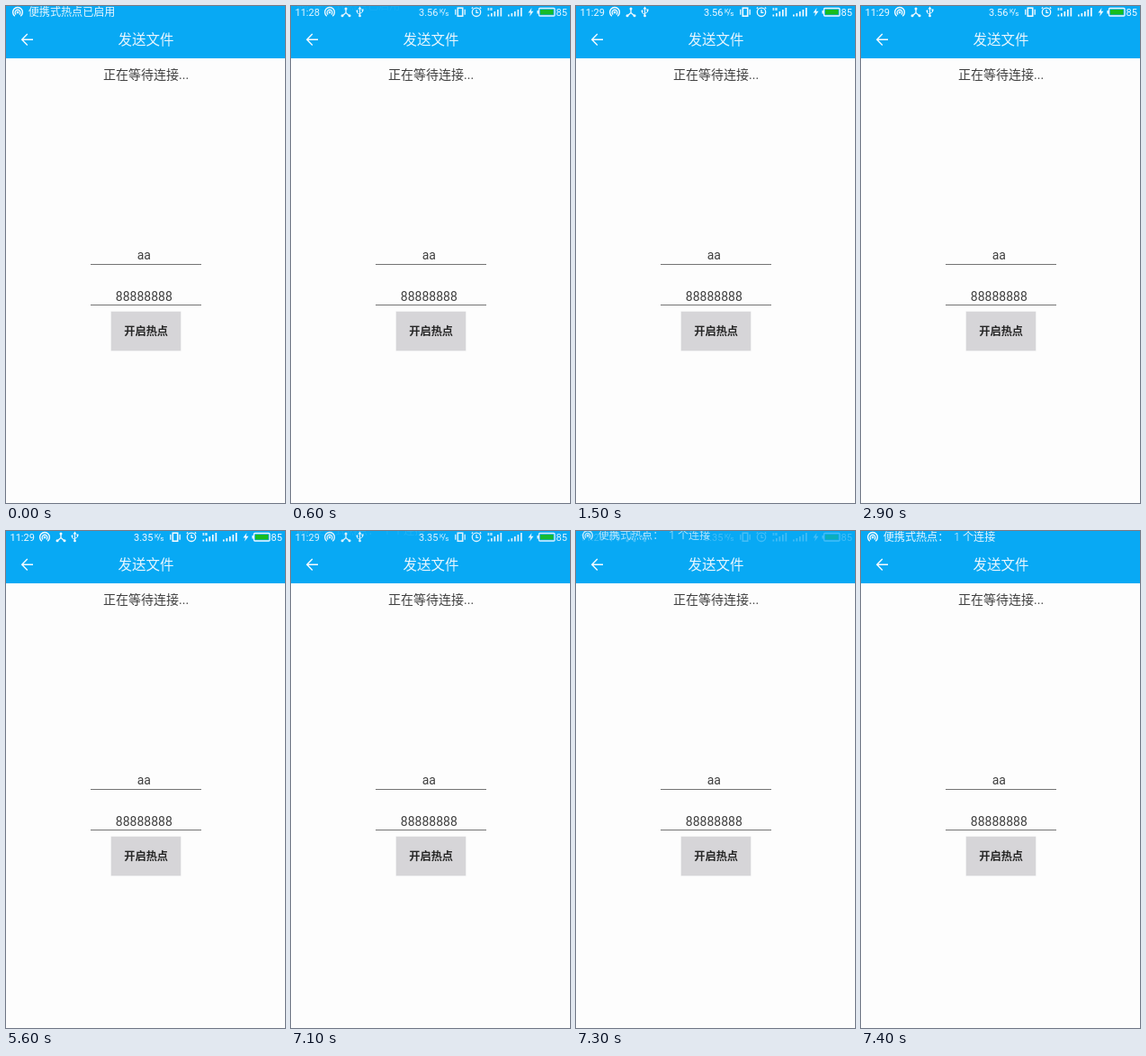
These frames come from a looping animation (310 by 551 pixels, 8000 ms). An HTML page:

```html
<!DOCTYPE html>
<html lang="zh-CN">
<head>
<meta charset="utf-8">
<style>
  html, body { margin: 0; width: 100%; height: 100%; overflow: hidden; background: #fdfdfd; }
  svg { display: block; width: 100vw; height: 100vh; }
  text { font-family: Roboto, "Noto Sans CJK SC", "Noto Sans CJK", sans-serif; white-space: pre; }
  .body { font-size: 14px; fill: #404040; text-anchor: middle; }
  .line { stroke: #747474; stroke-width: 1; }
  .bar { font-size: 11px; fill: #f2faff; }
  .tick { font-size: 12.1px; font-weight: 350; fill: #e4f5fe; }
  .ico { fill: none; stroke: #f2faff; stroke-width: 1.3; }
  .dot { fill: #f2faff; stroke: none; }
</style>
</head>
<body>
<svg viewBox="0 0 310 551">
  <defs>
    <g id="spot" class="ico">
      <path d="M-3.2 4.5A5.4 5.4 0 1 1 3.2 4.5" stroke-width="1.4"/>
      <path d="M-1.8 2.7A2.9 2.9 0 1 1 1.8 2.7" stroke-width="1.3"/>
      <circle class="dot" r="1.4" cy=".4"/>
    </g>
    <g id="bars" class="dot">
      <rect y="8" width="1.7" height="2"/>
      <rect x="3.5" y="6.5" width="1.7" height="3.5"/>
      <rect x="7" y="4.5" width="1.7" height="5.5"/>
      <rect x="10.5" y="2.5" width="1.7" height="7.5"/>
      <rect x="14" y=".5" width="1.7" height="9.5"/>
    </g>
  </defs>
  <rect width="310" height="551" fill="#fdfdfd"/>
  <rect width="310" height="58" fill="#08a9f4"/>

  <g id="status">
    <text id="clock" class="bar" x="4.5" y="10.5"></text>
    <use href="#spot" x="43" y="6.7"/>
    <g class="ico" transform="translate(61 7)">
      <path d="M0 -4V0.5L-4 4M0 0.5L4 4"/>
      <circle class="dot" cy="-4" r="1.5"/>
      <circle class="dot" cx="-4" cy="3.8" r="1.5"/>
      <circle class="dot" cx="4" cy="3.8" r="1.5"/>
    </g>
    <g class="ico" transform="translate(76.5 6.5)">
      <path d="M0 -4V4M-3 -1V1L0 3M3 -2V0L0 2" style="stroke-width:1"/>
      <path class="dot" d="M0 -6L2 -3H-2Z"/>
      <circle class="dot" cy="4.4" r="1.4"/>
      <circle class="dot" cx="-3" cy="-1" r="1.1"/>
      <rect class="dot" x="2" y="-3" width="2" height="2"/>
    </g>
    <text id="speed" class="bar" x="142" y="10.5"></text>
    <text class="bar" x="165" y="7.5" style="font-size:7px">K</text>
    <path class="ico" d="M168.6 10.5L171.4 3" style="stroke-width:.8"/>
    <text class="bar" x="171.3" y="11" style="font-size:8px">s</text>
    <g class="ico" transform="translate(188 6.7)">
      <rect x="-2.7" y="-4.5" width="5.4" height="9" style="stroke-width:1.6"/>
      <path d="M-5.2 -3V3M5.2 -3V3"/>
    </g>
    <g class="ico" transform="translate(206 6.8)">
      <circle r="4.7"/>
      <path d="M0 -2.7V.5H2.4M-5.2 -4L-3.8 -5.2M5.2 -4L3.8 -5.2"/>
    </g>
    <use href="#bars" x="218.5" y="1.5"/>
    <path class="dot" d="M218.5 2H220.3V5H218.5ZM221.3 2H223.6V5H221.3Z" opacity=".8"/>
    <use href="#bars" x="241" y="1.5"/>
    <path class="dot" d="M267.5 2L263.5 7.6H266L265.2 11.5L269.5 5.8H266.8Z"/>
    <rect class="ico" x="275.5" y="2.5" width="17.5" height="8.5" rx="1"/>
    <rect class="dot" x="273.4" y="5" width="1.8" height="3.5"/>
    <rect x="277" y="4" width="14.5" height="5.5" fill="#17bd1e"/>
    <text class="bar" x="294.5" y="10.5">85</text>
  </g>

  <g id="ticker">
    <use href="#spot" x="13" y="6.7"/>
    <text id="on" class="tick" x="24.7" y="10.7">便携式热点已启用</text>
    <text id="joined" class="tick" x="24.7" y="10.7">便携式热点：<tspan x="103.2">1</tspan><tspan x="113">个连接</tspan></text>
  </g>

  <path d="M30 37.2H18M23.8 31L17.7 37.2L23.8 43.4" fill="none" stroke="#f4fbff" stroke-width="1.4"/>
  <text x="155.5" y="42.8" text-anchor="middle" font-size="15.5" font-weight="350" fill="#e8f6fe">发送文件</text>

  <text class="body" x="155.6" y="81">正在等待连接...</text>
  <text class="body" x="153.3" y="281.4">aa</text>
  <path class="line" d="M94 286.5H217M94 331.5H217"/>
  <text class="body" x="153.3" y="326.5">88888888</text>
  <rect x="116.5" y="338.5" width="78" height="44" fill="#e6e5e7"/>
  <rect x="117" y="339" width="77" height="43" fill="#d6d5d8"/>
  <text x="155.7" y="364.6" text-anchor="middle" font-size="12.2" font-weight="700" fill="#262626">开启热点</text>
</svg>
<script>
  const LOOP = 8000, STEP = 100;
  const el = id => document.getElementById(id);
  const enter = [0.1, 0.35, 0.75, 1];

  // How far the ticker covers the status bar, 0 to 1
  function cover(t) {
    if (t < 600) return 1;
    if (t < 700) return 0.06;
    if (t < 7100) return 0;
    return enter[Math.min(3, Math.floor((t - 7100) / STEP))];
  }

  function draw(t) {
    const p = cover(t), late = t >= 7100;
    el("clock").textContent = t < 1500 ? "11:28" : "11:29";
    el("speed").textContent = t < 5600 ? "3.56" : "3.35";
    el("status").setAttribute("opacity", 1 - p);
    el("ticker").setAttribute("opacity", p);
    el("ticker").setAttribute("transform", `translate(0 ${-7 * (1 - p)})`);
    el("on").setAttribute("visibility", late ? "hidden" : "visible");
    el("joined").setAttribute("visibility", late ? "visible" : "hidden");
  }

  const start = performance.now();
  function frame() {
    draw((performance.now() - start) % LOOP);
    requestAnimationFrame(frame);
  }
  draw(0);
  requestAnimationFrame(frame);
</script>
</body>
</html>
```
